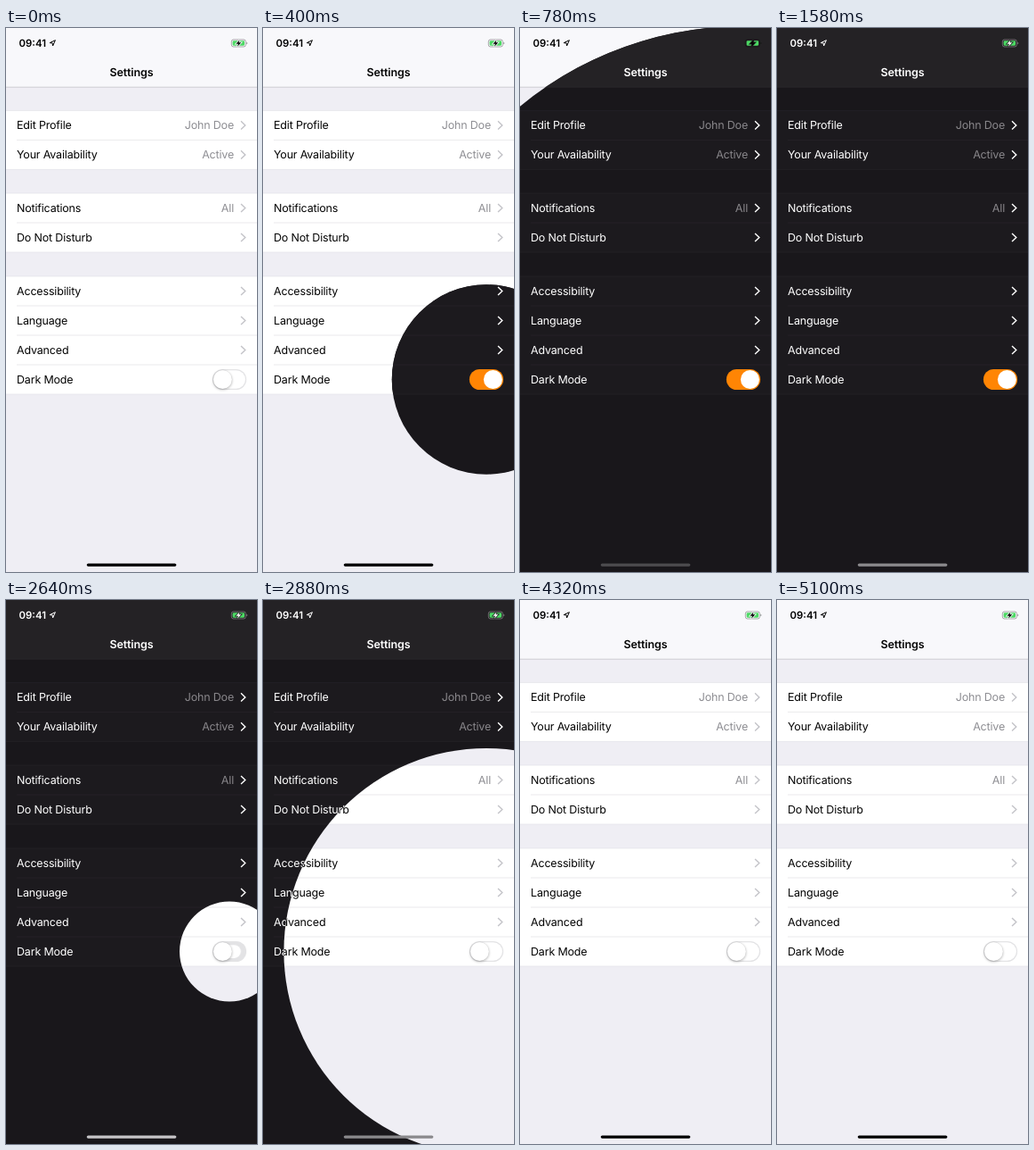
An HTML page for the animation above (5.74 s loop, 282 px wide and 609 px high).

```html
<!DOCTYPE html>
<html lang="en">
<head>
<meta charset="utf-8">
<title>Settings theme switch</title>
<style>
html, body { margin: 0; width: 100%; height: 100%; overflow: hidden; }
body { position: relative; background: #efeef4; }
svg { position: absolute; left: 0; top: 0; width: 282px; height: 609px; }
text {
  font: 400 12.5px Inter, Roboto, sans-serif;
  letter-spacing: -.18px;
  text-rendering: geometricPrecision;
}

.light {
  --bg: #efeef4; --bar: #f8f8fb; --row: #fff; --line: #dcdbe0; --edge: #e0dfe4;
  --barline: #c6c6ca; --ink: #050505; --value: #8e8e93; --chevron: #c3c3c8;
}
.dark {
  --bg: #19171b; --bar: #242225; --row: #1c1a1e; --line: #2a282c; --edge: #28262a;
  --barline: #2c2a2e; --ink: #fff; --value: #89878b; --chevron: #fff;
}
.bg { fill: var(--bg); }
.bar { fill: var(--bar); }
.row { fill: var(--row); }
.line { stroke: var(--line); stroke-width: .6; }
.edge { stroke: var(--edge); stroke-width: .6; }
.barline { stroke: var(--barline); stroke-width: .8; }
.label { fill: var(--ink); }
.value { fill: var(--value); text-anchor: end; }
.title { fill: var(--ink); font-weight: 600; text-anchor: middle; letter-spacing: -.1px; }
.chevron { fill: none; stroke: var(--chevron); stroke-width: 1.4; }
.knob { fill: #fff; }
.light .knob { filter: drop-shadow(0 1.6px 1.4px rgba(0, 0, 0, .28)); }
.rim { fill: none; stroke: rgba(0, 0, 0, .1); stroke-width: .5; }
.off { fill: #e3e3e5; }
.hole { fill: #fff; transform-origin: 251px 393.5px; }
.on { fill: #ff8504; }

/* Loop of 5740 ms; each reveal grows from the switch to the far corner. */
.page, .knobs, .hole, .on, .status, .home { animation: 5740ms linear infinite; }
#toDark { animation-name: revealDark; }
#toDark .knobs { animation-name: slideOn; }
#toDark .on { animation-name: tint; }
#toLight { animation-name: revealLight, appear; animation-timing-function: linear, step-end; }
#toLight .knobs { animation-name: slideOff; }
#toLight .hole { animation-name: openHole; }
.status { animation-name: statusColor; }
.home { animation-name: homeColor; }

@keyframes revealDark {
  0%, 1.498% { clip-path: circle(0px at 251px 393.5px); animation-timing-function: ease-in-out; }
  18.118%, 100% { clip-path: circle(467px at 251px 393.5px); }
}
@keyframes revealLight {
  0%, 42.004% { clip-path: circle(0px at 251px 393.5px); animation-timing-function: ease-in-out; }
  58.624%, 100% { clip-path: circle(467px at 251px 393.5px); }
}
@keyframes appear {
  0% { opacity: 0; }
  43.206%, 100% { opacity: 1; }
}
@keyframes slideOn {
  0%, 1.498% { transform: translateX(-15px); animation-timing-function: ease-in-out; }
  5.6%, 100% { transform: none; }
}
@keyframes slideOff {
  0%, 42.004% { transform: translateX(15px); animation-timing-function: ease-in-out; }
  45.9%, 100% { transform: none; }
}
@keyframes tint {
  0%, 1.498% { fill: #e3e3e5; }
  5%, 100% { fill: #ff8504; }
}
@keyframes openHole {
  0%, 42.004% { transform: scale(0); }
  47.6%, 100% { transform: scale(1); }
}
@keyframes statusColor {
  0%, 18.12% { color: #000; }
  19.51%, 58.885% { color: #fff; }
  60.28%, 100% { color: #000; }
}
@keyframes homeColor {
  0%, 7% { fill: #000; }
  9.756% { fill: #242326; }
  19.5%, 28% { fill: #8c8b8e; }
  34%, 46% { fill: #c6c5c8; }
  50.17% { fill: #8a898c; }
  57.14% { fill: #6c6c6e; }
  60.3%, 100% { fill: #000; }
}
</style>
</head>
<body>
<script>
const ROW = 33;
const GROUPS = [
  [92.4, [['Edit Profile', 'John Doe'], ['Your Availability', 'Active']]],
  [185, [['Notifications', 'All'], ['Do Not Disturb', '']]],
  [278, [['Accessibility', ''], ['Language', ''], ['Advanced', ''], ['Dark Mode', null]]],
];

const hline = (cls, x, y) => `<path class="${cls}" d="M${x} ${y}H282"/>`;

const pill = (cls, inset) => {
  const h = 23 - inset * 2;
  return `<rect class="${cls}" x="${231.9 + inset}" y="${382 + inset}"
    width="${38.2 - inset * 2}" height="${h}" rx="${h / 2}"/>`;
};

function toggle(on) {
  const x = on ? 258.4 : 243.4;
  const track = on ? pill('on', 0) : pill('off', 0) + pill('hole', 1.2);
  return track + `<g class="knobs"><circle class="knob" cx="${x}" cy="393.5" r="10.5"/>
    ${on ? '' : `<circle class="rim" cx="${x}" cy="393.5" r="10.6"/>`}</g>`;
}

// A null value marks the row that holds the switch.
function row([label, value], y) {
  const mid = y + ROW / 2;
  const baseline = Math.floor(mid + 4.5);
  const text = `<text class="label" x="12" y="${baseline}">${label}</text>`;
  if (value === null) return text;
  return text + `<text class="value" x="256" y="${baseline}">${value}</text>
    <path class="chevron" d="M264 ${mid - 4.6}l4.8 4.6l-4.8 4.6"/>`;
}

function group([top, rows]) {
  const height = rows.length * ROW;
  return `<rect class="row" y="${top}" width="282" height="${height}"/>` +
    hline('edge', 0, top) + hline('edge', 0, top + height) +
    rows.map((r, i) => (i ? hline('line', 12, top + i * ROW) : '') + row(r, top + i * ROW)).join('');
}

const page = (id, theme) => `<svg id="${id}" class="page ${theme}" viewBox="0 0 282 609">
  <rect class="bg" width="282" height="609"/>
  <rect class="bar" width="282" height="66"/>
  ${hline('barline', 0, 66.2)}
  <text class="title" x="141" y="54">Settings</text>
  ${GROUPS.map(group).join('')}
  ${toggle(theme === 'dark')}
</svg>`;

const BOLT = 'M262.6 13.2L258.4 17.7H261L259.9 20.9L264.2 16.3H261.5Z';

const overlay = `<svg viewBox="0 0 282 609">
  <mask id="cut" maskUnits="userSpaceOnUse" x="250" y="10" width="24" height="14">
    <rect x="250" y="10" width="24" height="14" fill="#fff"/>
    <path d="${BOLT}" stroke="#000" stroke-width="1.6"/>
  </mask>
  <g class="status" fill="currentColor">
    <text x="14.5" y="21" style="font-size:11.4px;font-weight:600;letter-spacing:0">09:41</text>
    <path d="M55.4 13.7L49.2 16.6L52.2 17L52.6 20Z" fill="none" stroke="currentColor" stroke-width="1" stroke-linejoin="round"/>
    <g mask="url(#cut)">
      <rect x="253.3" y="13" width="16" height="8" rx="2.2" fill="none" stroke="currentColor" stroke-width=".8" opacity=".42"/>
      <rect x="254.6" y="14.3" width="13.4" height="5.4" rx="1.1" fill="#4cd964"/>
    </g>
    <path d="M270.3 15.7q1.1 .4 1.1 1.3t-1.1 1.3z" opacity=".42"/>
    <path d="${BOLT}"/>
  </g>
  <rect class="home" x="90.7" y="599.4" width="100.7" height="3.4" rx="1.7"/>
</svg>`;

document.body.innerHTML =
  page('base', 'light') + page('toDark', 'dark') + page('toLight', 'light') + overlay;
</script>
</body>
</html>
```
